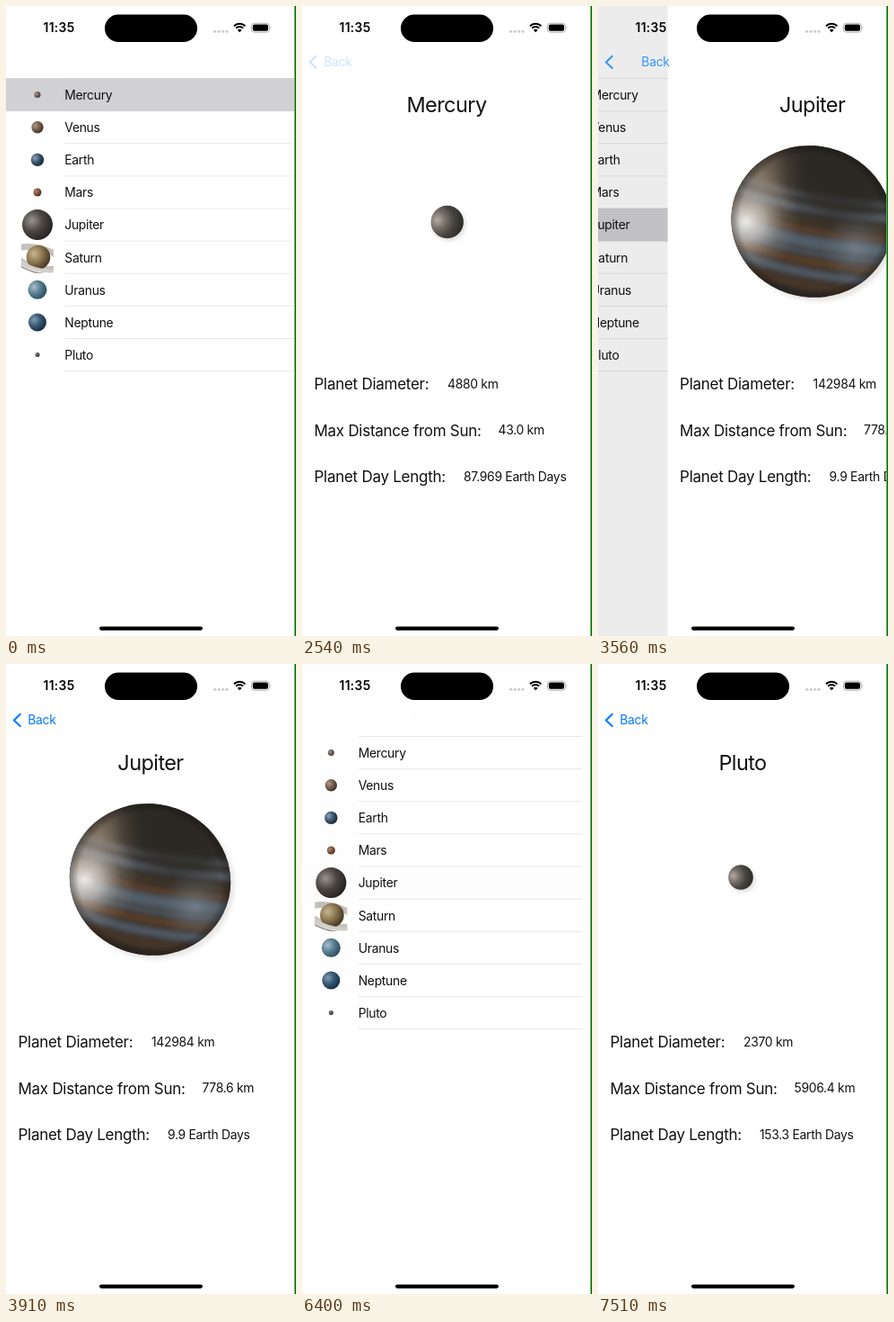
Animation, 323 px wide and 700 px high, one loop 8000 ms. Source, as an HTML page:

```html
<!DOCTYPE html>
<html lang="en">
<head>
<meta charset="utf-8">
<title>Planets</title>
<style>
  html, body { margin: 0; width: 100%; height: 100%; overflow: hidden; background: #fff; }
  svg { display: block; width: 323px; height: 700px; }
  text { font: 13.9px Inter, Roboto, sans-serif; letter-spacing: -.021em; fill: #111; }
  .title { font-size: 23.5px; letter-spacing: -.025em; text-anchor: middle; }
  .label { font-size: 17px; letter-spacing: -.016em; }
  .clock { font-weight: 600; letter-spacing: .02em; fill: #000; }
  .back text { fill: #007aff; }
  .back path { fill: none; stroke: #007aff; stroke-width: 2.1; stroke-linecap: round; stroke-linejoin: round; }
</style>
</head>
<body>
<svg id="stage" viewBox="0 0 323 700"></svg>
<script>
const LOOP = 8000, STEP = 50, WIDTH = 321, PARALLAX = 97;
const ROW_TOP = 80.5, ROW_HEIGHT = 36.13;

// name, icon radius, light, middle and dark tone
const planets = [
  ['Mercury', 3.5, '#a39a94', '#6f5f58', '#463a36'],
  ['Venus', 6.7, '#b09a88', '#75604f', '#3a2d25'],
  ['Earth', 7.2, '#8fa3b5', '#3d5770', '#16222f'],
  ['Mars', 4.5, '#b08a70', '#835640', '#452a20'],
  ['Jupiter', 17, '#9a948f', '#4a4541', '#25211f'],
  ['Saturn', 13.3, '#c9b792', '#8b7650', '#41351f'],
  ['Uranus', 10.5, '#a9c0ca', '#587e92', '#2b4a5c'],
  ['Neptune', 10, '#7f9bb2', '#365872', '#152a3d'],
  ['Pluto', 2.5, '#8d8a88', '#55504e', '#302c2b']
];

// row, times of tap, push, press on Back and pop, then the three values
const visits = [
  { row: 0, tap: 0, push: 60, press: 2540, pop: 2650, values: ['4880 km', '43.0 km', '87.969 Earth Days'] },
  { row: 4, tap: 3380, push: 3460, press: 6000, pop: 6150, values: ['142984 km', '778.6 km', '9.9 Earth Days'] },
  { row: 8, tap: 7010, push: 7060, press: LOOP, pop: LOOP, values: ['2370 km', '5906.4 km', '153.3 Earth Days'] }
];
const labels = [['Planet Diameter:', 162], ['Max Distance from Sun:', 218.5], ['Planet Day Length:', 180]];

const radial = (id, stops, at = 'cx=".32" cy=".36" r=".72"') =>
  `<radialGradient id="${id}" ${at}>${stops.map(([o, c, a = 1]) =>
    `<stop offset="${o}" stop-color="${c}" stop-opacity="${a}"/>`).join('')}</radialGradient>`;
const text = (x, y, s, cls = '') => `<text x="${x}" y="${y}" class="${cls}">${s}</text>`;
const ball = (x, y, r, fill) => `<circle cx="${x}" cy="${y}" r="${r}" fill="${fill}"/>`;
const glow = (id, x, y, r) => ball(x, y, r, `url(#${id})`);

const defs = `<defs>
  ${planets.map(([name, , a, b, c]) => radial(name, [[0, a], [.5, b], [1, c]])).join('')}
  ${radial('rock', [[0, '#b3ada6'], [.3, '#7b736b'], [.62, '#494540'], [1, '#2c2a28']], 'cx=".2" cy=".44" r=".8"')}
  ${radial('light', [[0, '#f6f2ed', .95], [.35, '#e0dad4', .65], [.7, '#b5aea7', .22], [1, '#9c958e', 0]], '')}
  ${radial('tan', [[0, '#a39078', .7], [1, '#857668', 0]], '')}
  ${radial('shade', [[0, '#2a2723', .95], [.6, '#2a2723', .7], [1, '#2a2723', 0]], '')}
  ${radial('haze', [[0, '#84909c', .6], [1, '#6c7681', 0]], '')}
  ${radial('rim', [[0, '#000', 0], [.88, '#000', 0], [1, '#15110e', .4]], '')}
  <clipPath id="disc"><ellipse rx="90" ry="84" transform="rotate(14)"/></clipPath>
  <clipPath id="tile"><rect x="17" y="262" width="36" height="35"/></clipPath>
  <filter id="soft" x="-20%" y="-20%" width="140%" height="140%"><feGaussianBlur stdDeviation="2.4"/></filter>
</defs>`;

function icon([name, r], row) {
  const y = ROW_TOP + ROW_HEIGHT * (row + .5);
  if (name !== 'Saturn') return ball(35, y, r, `url(#${name})`);
  return `<g clip-path="url(#tile)" fill="none">
    <ellipse cx="36" cy="280" rx="27" ry="11" transform="rotate(14 36 280)" stroke="#c4c0bb" stroke-width="7"/>
    ${ball(36, 279, r, 'url(#Saturn)')}
    <path d="M14 283Q34 297 56 294" stroke="#d2cfca" stroke-width="4"/>
    <path d="M14 288Q34 300 56 298" stroke="#a9a49d" stroke-width="2"/></g>`;
}

const list = `<rect width="${WIDTH}" height="700" fill="#fff"/>
  <path d="${planets.concat(0).map((_, i) => `M65.5 ${ROW_TOP + ROW_HEIGHT * i}H${WIDTH}`).join('')}" stroke="#e4e4e6" stroke-width=".8"/>
  <rect id="highlight" width="${WIDTH}" height="${ROW_HEIGHT + .6}" fill="#d1d0d3"/>
  ${planets.map((p, i) => icon(p, i) + text(65.3, ROW_TOP + ROW_HEIGHT * (i + .5) + 5.4, p[0])).join('')}
  <rect id="dim" width="${WIDTH}" height="700"/>`;

// height, thickness, colour
const bands = [
  [-42, 9, '#555a60'], [-28, 10, '#59616a'], [-15, 8, '#43372c'], [-4, 8, '#563e29'],
  [9, 14, '#515b66'], [21, 6, '#4b535c'], [31, 9, '#573e28'], [44, 10, '#4f5760'], [57, 10, '#463626']
];
const jupiter = `<g transform="translate(160.5 239.5)">
  <ellipse rx="90" ry="84" transform="translate(4 4) rotate(14)" fill="#c9c5c2" opacity=".45" filter="url(#soft)"/>
  <g clip-path="url(#disc)">
    <rect x="-95" y="-90" width="190" height="180" fill="#342e28"/>
    <g fill="none" filter="url(#soft)">${bands.map(([y, w, c]) =>
      `<path d="M-95 ${y - 14}Q-30 ${y + 17} 95 ${y + 25}" stroke="${c}" stroke-width="${w}"/>`).join('')}</g>
    ${glow('tan', -56, -50, 52)}${glow('shade', 34, -58, 76)}${glow('haze', 50, 30, 40)}
    ${glow('light', -73, 0, 60)}
    <ellipse rx="91" ry="85" transform="rotate(14)" fill="url(#rim)"/>
  </g></g>`;
const rock = (x, y, r) => `<circle cx="${x + 2}" cy="${y + 2.5}" r="${r}" fill="#bbb6b2" opacity=".5" filter="url(#soft)"/>${ball(x, y, r, 'url(#rock)')}`;
const portraits = [rock(161.7, 240, 18.2), jupiter, rock(159, 237, 13.8)];

const detail = (visit, i) => `<g class="page">
  <rect width="${WIDTH + 2}" height="700" fill="#fff"/>
  ${text(161, 117.6, planets[visit.row][0], 'title')}${portraits[i]}
  ${labels.map(([s, x], k) => text(13.5, 426.3 + 51.2 * k, s, 'label') + text(x, 425.2 + 51.2 * k, visit.values[k])).join('')}</g>`;

const arc = r => `M${260.2 - r * .74} ${28.6 - r * .74}A${r} ${r} 0 0 1 ${260.2 + r * .74} ${28.6 - r * .74}`;
const chrome = `<g class="back" id="back"><path d="M15.8 55.7L8.9 62.4L15.8 69.1"/><g id="backLabel">${text(24.2, 67.4, 'Back')}</g></g>
  ${text(41.5, 29.4, '11:35', 'clock')}
  <rect x="110" y="9.5" width="103" height="30.5" rx="15.25"/>
  ${[0, 1, 2, 3].map(i => ball(232.7 + i * 4.4, 28.2, 1.5, '#c9c9cb')).join('')}
  <path d="${arc(8.4)}${arc(5.3)}" fill="none" stroke="#000" stroke-width="2"/>
  <path d="M260.2 29.2L257.8 26.8Q260.2 24.9 262.6 26.8Z"/>
  <rect x="273.4" y="19.2" width="20" height="10" rx="3.2" fill="none" stroke="#a3a3a5" stroke-width=".9"/>
  <rect x="274.8" y="20.6" width="17.2" height="7.2" rx="2"/>
  <path d="M294.6 22.6Q296.4 24.2 294.6 25.8Z" fill="#a3a3a5"/>
  <rect x="104" y="689.5" width="115" height="4.2" rx="2.1"/>
  <rect x="321" width="1" height="700" fill="#5fa55f"/>
  <rect x="322" width="1" height="700" fill="#007a00"/>`;

const $ = id => document.getElementById(id);
$('stage').innerHTML = `${defs}<g id="list">${list}</g>${visits.map(detail).join('')}${chrome}`;
const pages = [...document.querySelectorAll('.page')];

const set = (el, attrs) => { for (const k in attrs) el.setAttribute(k, attrs[k]); };
const shift = (el, x) => set(el, { transform: `translate(${x.toFixed(2)} 0)` });

// Critically damped spring, sampled in steps
function progress(t, start) {
  const n = Math.floor((t - start) / STEP) + 1;
  if (n <= 0) return 0;
  if (n >= 10) return 1;
  const w = Math.sqrt(1000 / 3) * n * STEP / 1000;
  return 1 - (1 + w) * Math.exp(-w);
}

function render(t) {
  let current = 0;
  visits.forEach((v, i) => { if (t >= v.tap) current = i; });
  const v = visits[current];
  const popped = progress(t, v.pop);
  const shown = progress(t, v.push) * (1 - popped);

  shift($('list'), -PARALLAX * shown);
  set($('dim'), { opacity: .1 * shown });
  set($('highlight'), { y: ROW_TOP - .3 + ROW_HEIGHT * v.row, opacity: 1 - popped });
  pages.forEach((page, i) => {
    set(page, { visibility: i === current && shown > 0 ? 'visible' : 'hidden' });
    shift(page, WIDTH * (1 - shown));
  });
  set($('back'), { opacity: shown * (t >= v.press ? .2 : 1) });
  shift($('backLabel'), 100 * (1 - shown));
}

const start = performance.now();
function tick() {
  render((performance.now() - start) % LOOP);
  requestAnimationFrame(tick);
}
tick();
</script>
</body>
</html>
```
